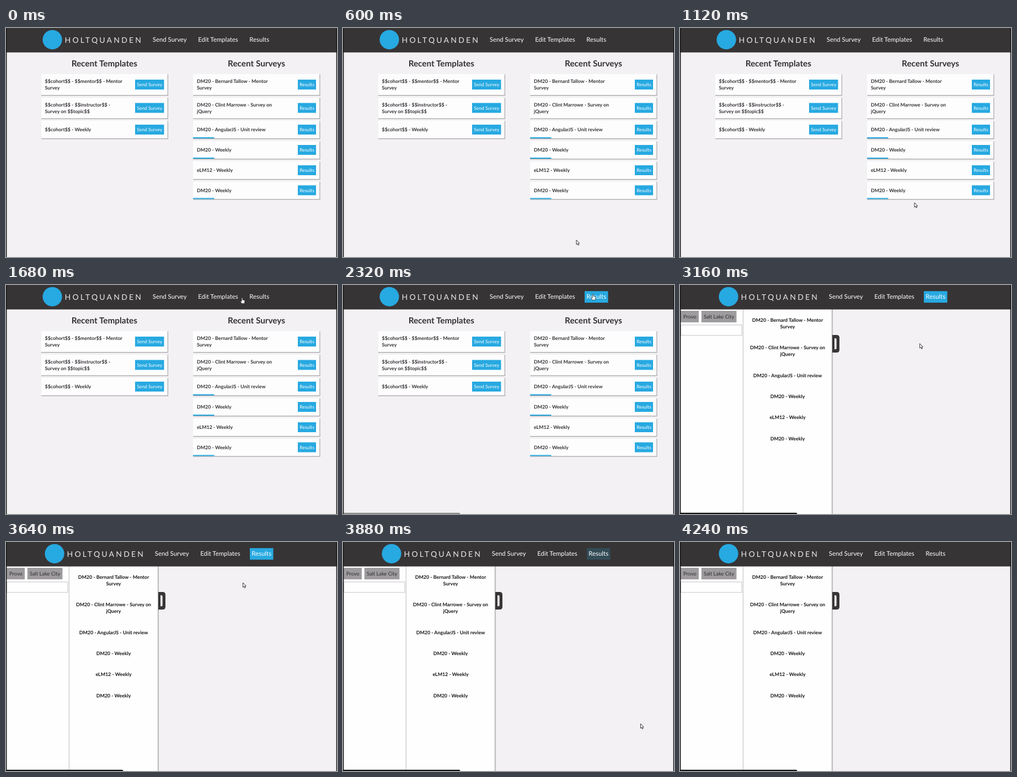
These frames come from a looping animation (600x417 px, 4600 ms). An HTML page:

```html
<!DOCTYPE html>
<html lang="en">
<head>
<meta charset="utf-8">
<title>Survey dashboard</title>
<style>
  html, body { margin: 0; width: 100%; height: 100%; overflow: hidden; }
  svg { display: block; width: 100vw; height: 100vh; }
  text { font-family: Lato, "Open Sans", sans-serif; text-rendering: geometricPrecision; white-space: pre; }
  .bold { font-weight: 700; }
</style>
</head>
<body>
<svg id="stage" viewBox="0 0 600 417">
  <rect width="600" height="417" fill="#f3f1f4"/>
  <g id="home"></g>
  <g id="results"></g>
  <rect width="600" height="44.5" fill="#373435"/>
  <g id="header"></g>
  <path id="status" d="M1 417V414.7H210Q212.5 414.7 212.5 417Z" fill="#111"/>
  <path d="M0 0H1.4V417H0ZM598.7 0H600V417H598.7Z" fill="#161516"/>
  <g id="cursor" stroke-linejoin="round">
    <path id="arrow" d="M0 0V8.3L1.9 6.7L3.2 9.6L4.6 9L3.3 6.1H5.7Z" fill="#fff" stroke="#222" stroke-width=".9"/>
    <path id="hand" d="M-.9 .6Q0 -.6 .9 .6V4L4 4.7Q5 5 4.9 6.2L4.2 10.8H-.8L-3 7.2Q-3.2 5.9 -2 6.2L-.9 7.2Z" fill="#fff" stroke="#222" stroke-width=".7"/>
  </g>
</svg>
<script>
const LOOP = 4600, STEP = 40, PAGE_CHANGE = 2480;
const BLUE = '#27a9e1', INK = '#343135';
const $ = id => document.getElementById(id);

function add(parent, tag, attrs, content = '') {
  const el = document.createElementNS('http://www.w3.org/2000/svg', tag);
  for (const key in attrs) el.setAttribute(key, attrs[key]);
  el.textContent = content;
  return parent.appendChild(el);
}
const rect = (parent, x, y, width, height, fill, more) =>
  add(parent, 'rect', { x, y, width, height, fill, ...more });
const text = (parent, content, x, y, size, fill, more) =>
  add(parent, 'text', { x, y, 'font-size': size, fill, ...more }, content);
const bold = { class: 'bold' };
const middle = { 'text-anchor': 'middle' };
const boldMiddle = { ...bold, ...middle };

const mentorSurvey = ['DM20 - Bernard Tallow - Mentor', 'Survey'];
const topicSurvey = ['DM20 - Clint Marrowe - Survey on', 'jQuery'];
const unitSurvey = ['DM20 - AngularJS - Unit review'];
const weekly = ['DM20 - Weekly'], otherWeekly = ['eLM12 - Weekly'];

// Cards on the first page
const cardTops = [84, 126.5, 169, 206, 243, 279.5];
function card(x, index, lines, label, buttonWidth, progress) {
  const home = $('home'), top = cardTops[index];
  const height = lines.length > 1 ? 38 : 32, mid = top + height / 2;
  rect(home, x, top, 230.6, height + 1.4, '#000', { opacity: .1 });
  rect(home, x + .6, top + .6, 229.8, height + .6, '#000', { opacity: .25 });
  rect(home, x, top, 229.3, height, '#fefdfe');
  if (progress) rect(home, x, top + height - 2, 38.5, 2, BLUE);
  lines.forEach((line, i) =>
    text(home, line, x + 7, mid + 3.1 + (i - (lines.length - 1) / 2) * 12, 8.85, INK, bold));
  const left = x + 223 - buttonWidth;
  rect(home, left, mid - 9, buttonWidth, 18, BLUE);
  text(home, label, left + buttonWidth / 2, mid + 3, 8.5, '#fff', middle);
}
text($('home'), 'Recent Templates', 178.3, 69.5, 15.3, INK, boldMiddle);
text($('home'), 'Recent Surveys', 454, 69.5, 15.3, INK, boldMiddle);
[
  ['$$cohort$$ - $$mentor$$ - Mentor', 'Survey'],
  ['$$cohort$$ - $$instructor$$ -', 'Survey on $$topic$$'],
  ['$$cohort$$ - Weekly']
].forEach((lines, i) => card(63.5, i, lines, 'Send Survey', 52.5));
[mentorSurvey, topicSurvey, unitSurvey, weekly, otherWeekly, weekly]
  .forEach((lines, i) => card(339, i, lines, 'Results', 33, [2, 3, 5].includes(i)));

// Results page
const page = $('results');
add(page, 'path', {
  d: 'M270 91H284Q289 91 289 96V118Q289 123 284 123H270ZM280 97V117H282Q283.7 117 283.7 115V99Q283.7 97 282 97Z',
  fill: '#383537', 'fill-rule': 'evenodd'
});
rect(page, 275, 44, 1.2, 373, '#a9a7aa');
rect(page, 276.2, 44, 1.2, 373, '#000', { opacity: .1 });
rect(page, 1, 44, 274, 373, '#fefefe');
rect(page, 113.8, 44, 1, 373, '#bcbabd');
for (const [label, x, width] of [['Provo', 1, 33], ['Salt Lake City', 38.8, 63.6]]) {
  rect(page, x, 47, width, 21, '#9e9b9f');
  text(page, label, x + width / 2 + (x === 1 ? .5 : 0), 60.6, 9.3, '#2d2b2e', middle);
}
rect(page, 1.5, 72.8, 110.5, 19, '#fff', { stroke: '#c4c2c5', 'stroke-width': 1 });
[
  [mentorSurvey, 67], [topicSurvey, 117], [unitSurvey, 167.6],
  [weekly, 206], [otherWeekly, 244.2], [weekly, 283]
].forEach(([lines, y]) => lines.forEach((line, i) =>
  text(page, line, 195, y + i * 12, 8.85, '#151416', boldMiddle)));

// Header
const header = $('header');
add(header, 'circle', { cx: 84, cy: 21.3, r: 17.6, fill: BLUE });
text(header, 'HOLTQUANDEN', 106.5, 27, 14, '#eceaec', { 'letter-spacing': 3.2 });
const highlight = rect(header, 438, 11.2, 42.5, 21, BLUE);
[['Send Survey', 296.7], ['Edit Templates', 384.5], ['Results', 459.2]]
  .forEach(([label, x]) => text(header, label, x, 25.3, 11.4, '#fff', middle));

// Pointer path: time, x, y
const path = [
  [160, 592, 418], [360, 500, 404], [560, 423, 386], [680, 423, 386],
  [1120, 425, 318], [1400, 427, 160], [1680, 428, 23],
  [2000, 453, 16.5], [2360, 453, 16.5], [2600, 449, 15.5], [2880, 449, 15.5],
  [3120, 435, 95], [3340, 431, 229], [3420, 431, 226], [3640, 429.5, 74],
  [3720, 435, 82], [3960, 576, 418]
];
const clamp = v => Math.max(0, Math.min(1, v));
const ramp = (t, from, to) => clamp((t - from) / (to - from));

function pointer(t) {
  const next = Math.max(1, path.findIndex(p => p[0] > t));
  const [t0, x0, y0] = path[next - 1], [t1, x1, y1] = path[next];
  const k = ramp(t, t0, t1), ease = k * k * (3 - 2 * k);
  return [x0 + (x1 - x0) * ease, y0 + (y1 - y0) * ease];
}

function draw(now) {
  const t = Math.floor(now % LOOP / STEP) * STEP;
  const changed = t >= PAGE_CHANGE;
  $('home').setAttribute('visibility', changed ? 'hidden' : 'visible');
  page.setAttribute('visibility', changed ? 'visible' : 'hidden');
  header.setAttribute('transform', `translate(${changed ? 4 : 0})`);
  highlight.setAttribute('opacity', ramp(t, 1760, 1960) - ramp(t, 3720, 3920));
  $('status').setAttribute('opacity', .45 * ramp(t, 2280, 2320) + .55 * ramp(t, 2320, 2440));

  const shown = t >= path[0][0] && t < path[path.length - 1][0];
  $('cursor').setAttribute('display', shown ? 'inline' : 'none');
  if (shown) {
    const [x, y] = pointer(t), onLink = y < 44 && t < PAGE_CHANGE;
    $('cursor').setAttribute('transform', `translate(${x} ${y})`);
    $('hand').setAttribute('display', onLink ? 'inline' : 'none');
    $('arrow').setAttribute('display', onLink ? 'none' : 'inline');
  }
}

const start = performance.now();
function tick() {
  draw(performance.now() - start);
  requestAnimationFrame(tick);
}
tick();
</script>
</body>
</html>
```
